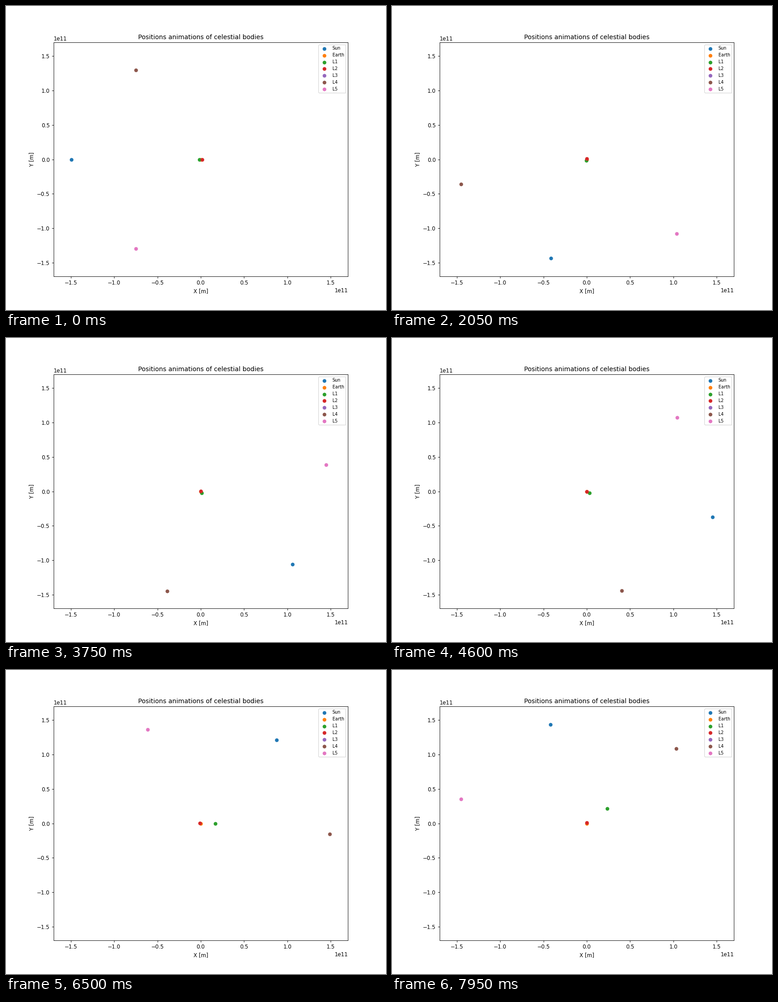
Write a matplotlib script that moves like this. It is 837 px wide and 669 px high and loops after 8 s.

```python
import matplotlib.pyplot as plt
import numpy as np
from matplotlib.animation import FuncAnimation

WIDTH, HEIGHT, DPI = 837, 669, 83.7
FRAMES, STEP_MS = 160, 50
AU, GM = 1.496e11, 1e9  # metres, gigametre
TURN = 1.801  # orbital degrees per frame


def polar(radius, degrees):
    a = np.radians(degrees)
    return radius * np.cos(a), radius * np.sin(a)


def sun(k):
    return polar(AU, 180 + TURN * k)


def earth(k):
    return 0, 0


def l1(k):
    """Follows the Sun's direction, then lags behind and escapes."""
    lag = 33 * (1 + np.tanh((k - 100) / 35))
    escape = 40 / (1 + np.exp(-0.058 * (k - 138.4)))
    return polar((1.5 + escape) * GM, 180 + TURN * k - lag)


def l2(k):
    """Falls through the centre and swings out on the other side."""
    radius = 0.28 + 1.22 * np.cos(np.pi * k / 150)
    return polar(radius * GM, 110 * np.sin(np.pi * k / 124))


def l3(k):
    return polar(2 * AU, 180 + TURN * k)


def l4(k):
    return polar(AU, 120 + TURN * k)


def l5(k):
    return polar(AU, 240 + TURN * k)


BODIES = {"Sun": sun, "Earth": earth, "L1": l1, "L2": l2,
          "L3": l3, "L4": l4, "L5": l5}

# The tiny surplus keeps the pixel size from being truncated.
fig, ax = plt.subplots(
    figsize=((WIDTH + 0.001) / DPI, (HEIGHT + 0.001) / DPI), dpi=DPI)
# Margins are those of a figure exactly 8 inches high.
scale = 8 * DPI / HEIGHT
fig.subplots_adjust(bottom=0.11 * scale, top=0.88 * scale)

dots = [ax.scatter(*place(0), label=name) for name, place in BODIES.items()]
ax.set_xlim(-1.7e11, 1.7e11)
ax.set_ylim(-1.7e11, 1.7e11)
ax.set_xlabel("X [m]")
ax.set_ylabel("Y [m]")
ax.set_title("Positions animations of celestial bodies")
ax.legend(loc="upper right", fontsize="small")


def update(k):
    for dot, place in zip(dots, BODIES.values()):
        dot.set_offsets([place(k)])
    return dots


anim = FuncAnimation(fig, update, frames=FRAMES, interval=STEP_MS,
                     repeat=True, repeat_delay=0)
plt.show()
```
